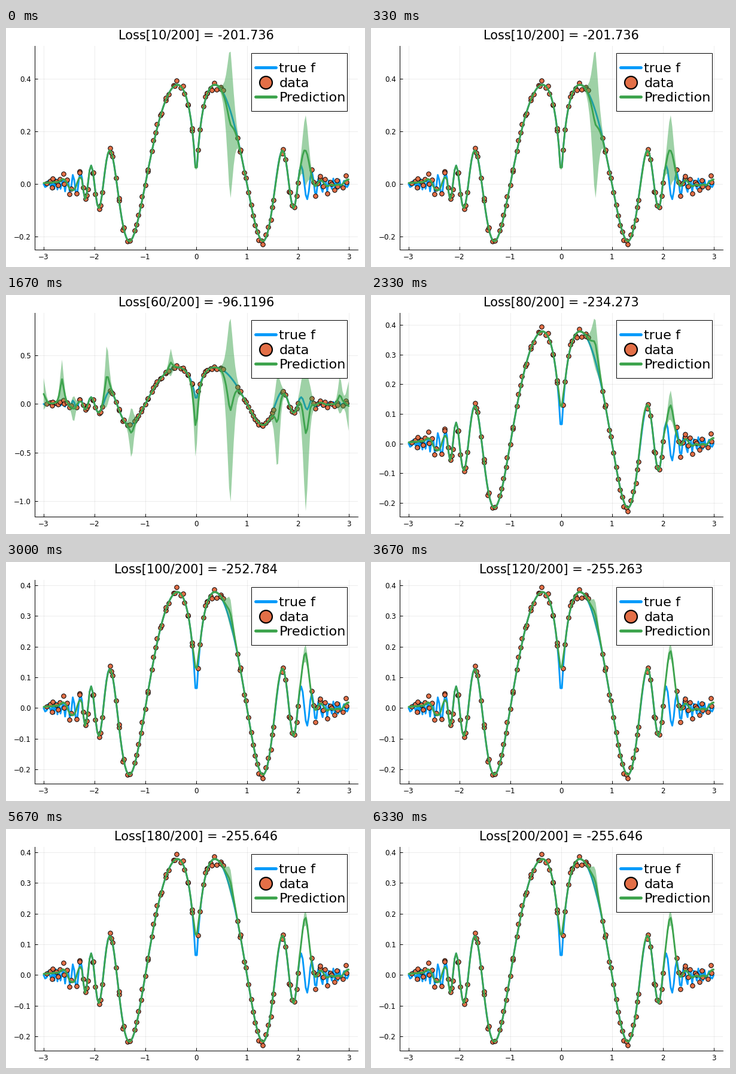
A matplotlib script that plays this animation: 600x400 px, repeating every 6660 ms.

```python
import numpy as np
import matplotlib.pyplot as plt
from matplotlib.animation import FuncAnimation
from matplotlib.patches import Rectangle

W, H, DPI = 600, 400, 100
BLUE, ORANGE, GREEN = "#009AFA", "#E36F47", "#3EA44E"
TOP, BOTTOM, RIGHT = 30, 371.2, 588
DATA_LOW, DATA_HIGH = -.228, .399

plt.rcParams["font.family"] = "DejaVu Sans"


def pt(px):
    return px * 72 / DPI


def target(x):
    return np.sinc(np.abs(x) ** np.abs(x))


def ease(x, a, b):
    t = np.clip((x - a) / (b - a), 0, 1)
    return t * t * (3 - 2 * t)


# Stretches without observations: centre, uncertainty, pull on the mean.
GAPS = np.array([(-3, .16, .1), (-2.64, .2, .24), (-2.41, .14, -.03), (-1.755, .33, .2),
                 (-1.27, .27, -.09), (-.5, .14, .07), (-.01, .33, -.29), (.67, .97, -.35),
                 (1.6, .5, -.25), (2.155, .8, -.26), (2.83, .2, .1), (3, .25, -.04)])
centre, doubt, pull = GAPS.T

# Key fits: spread, contrast between gaps, pull, hump near x = 2.1, rounding at 0.
FITS = [(.32, 4, .16, .15, 0),
        (.745, 2.2, .6, 0, 0),
        (1, 1, 1, 0, 0),
        (.09, 3, -.18, .1, .065),
        (.042, 3, -.08, .175, .075)]
FIT_FRAMES = [0, 3, 5, 7]
LOSS = {0: -201.736, 3: -156.063, 5: -96.1196, 7: -234.273,
        11: -255.263, 14: -255.642, 19: -255.646}
LOSS_LIMIT = -255.6462

# Noisy observations, evenly jittered and absent from the gaps.
rng = np.random.default_rng(3)
data_x = np.linspace(-2.97, 2.98, 138) + rng.uniform(-.03, .03, 138)
in_gap = np.abs(data_x[:, None] - centre) < .13 * doubt
data_x = data_x[~in_gap.any(axis=1)]
data_y = target(data_x) + rng.normal(0, .01, data_x.size)
data_y = np.clip(data_y, DATA_LOW, DATA_HIGH)

x = np.linspace(-3, 3, 200)
true_y = target(x)
bells = np.exp(-np.abs((x[:, None] - centre) / (.045 + .04 * doubt)) ** 1.5)

# In the fast outer ripples the fit only follows a local average of the data.
weight = np.exp(-((x[:, None] - data_x) / .045) ** 2 / 2)
average = weight @ data_y / weight.sum(axis=1)
smooth_y = true_y + ease(np.abs(x), 2.2, 2.3) * (average - true_y)


def predict(spread, contrast, strength, hump, rounding):
    mean = smooth_y + rounding * np.exp(-(x / .03) ** 2 / 2)
    if hump:
        window = ease(x, 1.98, 2.06) * (1 - ease(x, 2.24, 2.34))
        mean += window * (hump * np.exp(-((x - 2.145) / .075) ** 2 / 2) - mean)
    mean += bells @ (strength * doubt ** (contrast - 1) * pull)
    return np.array([mean, .004 + bells @ (spread * doubt ** contrast)])


fits = [predict(*fit) for fit in FITS]


def stage(i):
    """Position along the fits; the last one is approached exponentially."""
    if i <= FIT_FRAMES[-1]:
        return np.interp(i, FIT_FRAMES, range(4))
    return 4 - np.exp(FIT_FRAMES[-1] - i)


def loss(i):
    excess = np.log(np.array(list(LOSS.values())) - LOSS_LIMIT)
    return LOSS_LIMIT + np.exp(np.interp(i, list(LOSS), excess))


def label(v, digits):
    return f"{v:.{digits}f}".replace("-", "\u2212")


fig = plt.figure(figsize=(W / DPI, H / DPI), dpi=DPI, facecolor="white")
ax = fig.add_axes([0, 0, 1, 1])
ax.set_axisbelow(True)
ax.set_xlim(-3.18, 3.18)
ax.spines[["top", "right"]].set_visible(False)
ax.spines[["left", "bottom"]].set_linewidth(pt(1))
ax.grid(color="black", alpha=.07, lw=pt(1))
ax.tick_params(direction="in", length=pt(5), width=pt(1), labelsize=8.6)
ax.tick_params(axis="x", pad=pt(6))
ax.tick_params(axis="y", pad=pt(5.5))
ax.set_xticks(range(-3, 4), [label(v, 0) for v in range(-3, 4)])

line_style = dict(lw=pt(2.9), solid_capstyle="round", solid_joinstyle="round")
ax.plot(x, true_y, color=BLUE, zorder=2, **line_style)
ax.plot(data_x, data_y, "o", ms=pt(7.5), mfc=ORANGE, mec="black", mew=pt(1), zorder=3)
ribbon, = ax.fill([0, 0, 0], [0, 0, 0], color=GREEN, alpha=.5, lw=0, zorder=4)
curve, = ax.plot(x, true_y, color=GREEN, zorder=5, **line_style)

# Overlay in pixel coordinates for the title and the legend.
over = fig.add_axes([0, 0, 1, 1])
over.set_xlim(0, W)
over.set_ylim(H, 0)
over.axis("off")
title = over.text(318, 18.9, "", fontsize=15, ha="center", va="baseline")
box = over.add_patch(Rectangle((409.5, 42), 160.5, 97, fc="white", ec="black", lw=pt(1)))
for row, (text, color) in enumerate([("true f", BLUE), ("data", ORANGE),
                                     ("Prediction", GREEN)]):
    y = 66.4 + 24.3 * row
    if text == "data":
        over.plot(434, y, "o", ms=pt(21), mfc=color, mec="black", mew=pt(2.2))
    else:
        over.plot([416.5, 451], [y, y], color=color, lw=pt(5), solid_capstyle="round")
    over.text(456.3, y + 8, text, fontsize=16.1, va="baseline")


def update(i):
    k = min(int(stage(i)), len(fits) - 2)
    t = stage(i) - k
    mean, sd = (1 - t) * fits[k] + t * fits[k + 1]
    low, high = mean - sd, mean + sd
    curve.set_ydata(mean)
    ribbon.set_xy(np.column_stack([np.append(x, x[::-1]), np.append(low, high[::-1])]))

    lo, hi = min(low.min(), DATA_LOW), max(high.max(), DATA_HIGH)
    span = hi - lo
    lo, hi = lo - .03 * span, hi + .03 * span
    step = .1 if span < .7 else .2 if span < .82 else .25 if span < 1.6 else .5
    ticks = np.arange(np.ceil(lo / step), np.floor(hi / step) + 1) * step + 0.0
    ax.set_yticks(ticks, [label(v, 2 if step == .25 else 1) for v in ticks])
    ax.set_ylim(lo, hi)

    # Two-decimal labels need a wider margin.
    left = 55.4 if step == .25 else 47.6
    ax.set_position([left / W, 1 - BOTTOM / H, (RIGHT - left) / W, (BOTTOM - TOP) / H])
    title.set_x((left + RIGHT) / 2)
    title.set_text(f"Loss[{10 * (i + 1)}/200] = {loss(i):.6g}")
    return curve, ribbon, title


anim = FuncAnimation(fig, update, frames=20, interval=333, repeat=True,
                     repeat_delay=0, blit=False)
plt.show()
```
